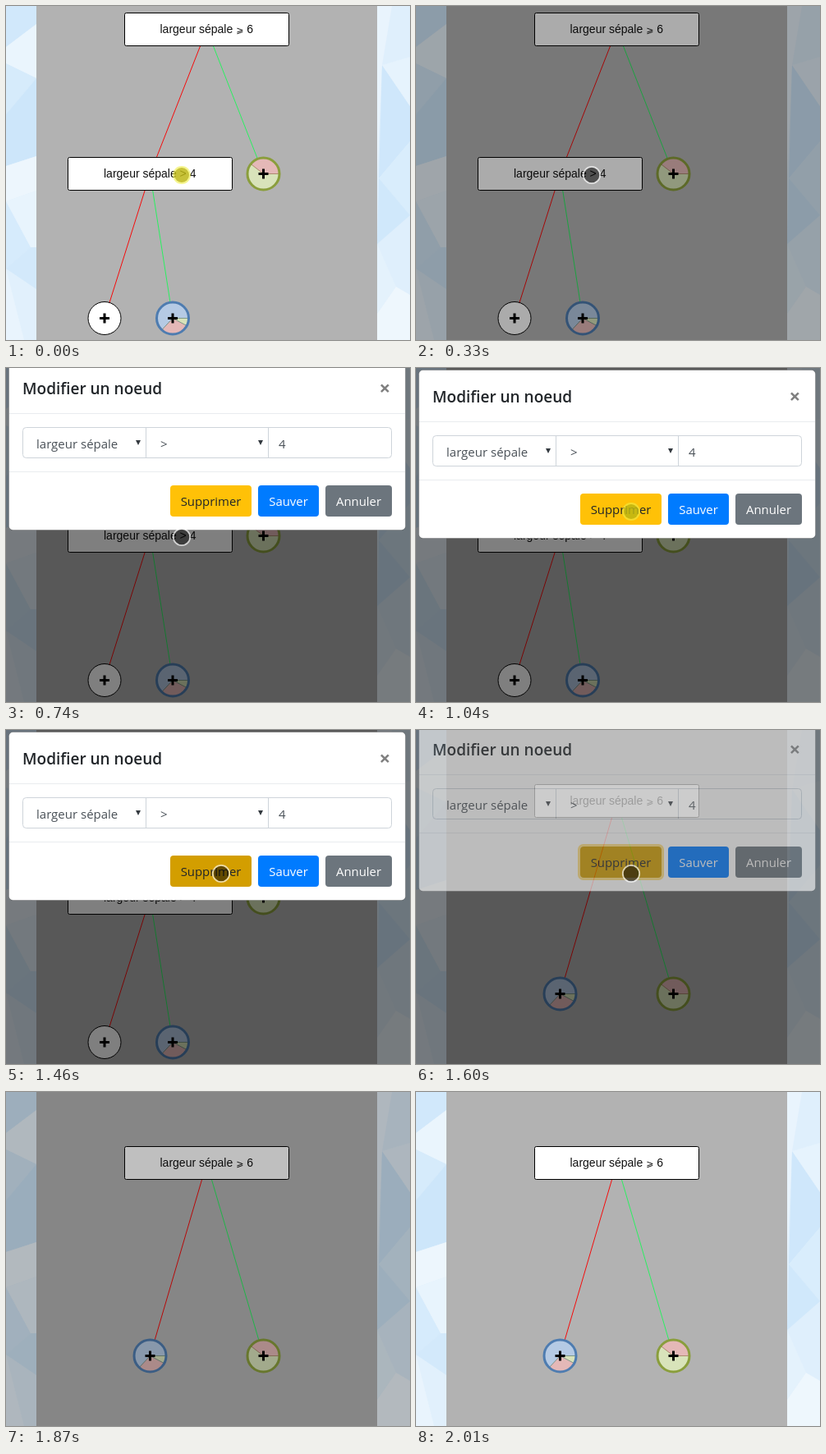
An HTML page for the animation above (2360 ms loop, 492x407 px).

```html
<!DOCTYPE html>
<html lang="fr">
<head>
<meta charset="utf-8">
<title>Modifier un noeud</title>
<style>
  html, body { margin: 0; width: 100%; height: 100%; overflow: hidden; background: #b2b2b2; }
  svg { display: block; width: 492px; height: 407px; }

  .label { font: 14px "Liberation Sans", Arial, sans-serif; fill: #111; }
  .sign { font: 11px "DejaVu Sans", sans-serif; }
  .box { fill: #fff; stroke: #000; }
  .no { fill: none; stroke: #f50a0a; }
  .yes { fill: none; stroke: #2af060; }
  .plus { fill: none; stroke: #000; stroke-width: 3; }

  .modal text { font: 15px "Open Sans", "Noto Sans", sans-serif; fill: #495057; }
  .modal .title { font-size: 19px; font-weight: 600; fill: #212529; }
  .modal .close { font-size: 24px; font-weight: 700; fill: #7f7f7f; }
  .modal .btn { font-size: 14.9px; font-weight: 500; fill: #fff; text-anchor: middle; }
  .modal .dark { fill: #212529; }
  .field { fill: none; stroke: #ced4da; }
  .rule { stroke: #e9ecef; }

  /* every pose is held until the next one */
  .before, .after, .shade, .modal, .delete, .focus, .cursor, .idle, .down {
    animation: 2360ms step-end infinite;
  }
  .before { animation-name: before; }
  .after { animation-name: after; }
  .shade { animation-name: shade; }
  .modal { animation-name: modal; }
  .delete { animation-name: delete; }
  .focus { animation-name: focus; }
  .cursor { animation-name: cursor; }
  .idle { animation-name: idle; }
  .down { animation-name: down; }

  @keyframes before { 0% { opacity: 1 } 67.796%, 100% { opacity: 0 } }
  @keyframes after { 0% { opacity: 0 } 67.796%, 100% { opacity: 1 } }
  @keyframes shade {
    0% { opacity: 0 }
    13.983% { opacity: .33 }
    19.915% { opacity: .5 }
    79.237% { opacity: .25 }
    85.169%, 100% { opacity: 0 }
  }
  @keyframes modal {
    0% { opacity: 0; transform: translateY(-50px) }
    19.915% { opacity: .22; transform: translateY(-41px) }
    25.847% { opacity: 1; transform: translateY(-20px) }
    31.355% { opacity: 1; transform: translateY(-10px) }
    37.711% { opacity: 1; transform: none }
    67.796% { opacity: .6; transform: translateY(-11px) }
    73.728% { opacity: .1; transform: translateY(-31px) }
    79.237%, 100% { opacity: 0; transform: translateY(-50px) }
  }
  @keyframes delete {
    0% { fill: #ffc107 }
    50% { fill: #e0a800 }
    55.932%, 100% { fill: #d39e00 }
  }
  @keyframes focus { 0% { opacity: 0 } 67.796%, 100% { opacity: .5 } }
  @keyframes cursor {
    0% { opacity: 1; transform: translate(214px, 206px) }
    44.067% { opacity: 1; transform: translate(262px, 175px) }
    79.237%, 100% { opacity: 0; transform: translate(262px, 175px) }
  }
  @keyframes idle { 0%, 44.067% { opacity: 1 } 8.05%, 61.864%, 100% { opacity: 0 } }
  @keyframes down { 0%, 44.067% { opacity: 0 } 8.05%, 61.864%, 100% { opacity: 1 } }
</style>
</head>
<body>
<svg viewBox="0 0 492 407">
  <defs>
    <path id="plus" class="plus" d="M-6 0H6M0-6V6"/>
    <g id="blueNode">
      <circle r="19.5" fill="#b5cae4"/>
      <path d="M0 0H19A19 19 0 0 1 16.8 8.9Z" fill="#d8e3ba"/>
      <path d="M0 0L16.8 8.9A19 19 0 0 1-13 13.9Z" fill="#e4b8b7"/>
      <path d="M19 0H0L16.8 8.9M0 0L-13 13.9" fill="none" stroke="#6c8a78" stroke-width=".8"/>
      <circle r="19.5" fill="none" stroke="#4e7cb0" stroke-width="3"/>
      <use href="#plus"/>
    </g>
    <g id="greenNode">
      <circle r="19.5" fill="#d8e3ba"/>
      <path d="M0 0L-15-11.7A19 19 0 0 1 19 0Z" fill="#e4b8b7"/>
      <path d="M-15-11.7L0 0H19" fill="none" stroke="#a3795c" stroke-width=".8"/>
      <circle r="19.5" fill="none" stroke="#8a9e3c" stroke-width="3"/>
      <use href="#plus"/>
    </g>
    <rect id="box" class="box" x="-100" y="-20" width="200" height="40" rx="2"/>
    <g id="root">
      <use href="#box"/>
      <text class="label" x="-57" y="4.5">largeur sépale <tspan class="sign">⩾</tspan> 6</text>
    </g>
  </defs>

  <g>
    <path fill="#e1f0fc" d="M0 0H37V407H0Z"/>
    <path fill="#d1e8fb" d="M0 0H37V22L0 50Z"/>
    <path fill="#eaf5fd" d="M0 50L37 22V88L0 70Z"/>
    <path fill="#d6ebfb" d="M0 70L37 88L0 132Z"/>
    <path fill="#cde6fa" d="M0 132L37 88V183L0 195Z"/>
    <path fill="#edf6fd" d="M0 195L37 183V225L0 238Z"/>
    <path fill="#d6ebfc" d="M0 238L30 294L0 320Z"/>
    <path fill="#e8f4fd" d="M37 225V294H30L0 238Z"/>
    <path fill="#d3e9fb" d="M0 320L30 294H37V345Z"/>
    <path fill="#e9f4fd" d="M0 320L22 407H0Z"/>

    <path fill="#dfeffc" d="M452 0H492V407H452Z"/>
    <path fill="#e9f4fd" d="M452 0H470L458 72L452 210Z"/>
    <path fill="#cfe7fb" d="M458 72L492 122V165L454 210Z"/>
    <path fill="#e6f3fd" d="M458 72L492 62V122Z"/>
    <path fill="#d9edfc" d="M454 210L492 165V255Z"/>
    <path fill="#d0e8fb" d="M454 210L492 255L452 290Z"/>
    <path fill="#e4f2fc" d="M452 290L475 342L452 375Z"/>
    <path fill="#eef7fd" d="M475 342L492 352V407H452V375Z"/>
  </g>
  <path fill="#b2b2b2" d="M37 0H452V407H37Z"/>

  <g class="before">
    <path class="no" d="M244.5 28.5L175.5 204.5L120 380.5"/>
    <path class="yes" d="M244.5 28.5L313.5 204.5M175.5 204.5L203 380.5"/>
    <use href="#root" x="244.5" y="28.5"/>
    <use href="#box" x="175.5" y="204.5"/>
    <text class="label" x="119" y="209">largeur sépale &gt; 4</text>
    <use href="#greenNode" x="313.5" y="204.5"/>
    <g transform="translate(120 380.5)">
      <circle r="20" fill="#fff" stroke="#000"/>
      <use href="#plus"/>
    </g>
    <use href="#blueNode" x="203" y="380.5"/>
  </g>

  <g class="after">
    <path class="no" d="M244.5 86.5L175.5 321.5"/>
    <path class="yes" d="M244.5 86.5L313.5 321.5"/>
    <use href="#root" x="244.5" y="86.5"/>
    <use href="#blueNode" x="175.5" y="321.5"/>
    <use href="#greenNode" x="313.5" y="321.5"/>
  </g>

  <rect class="shade" width="492" height="407"/>

  <g class="modal">
    <rect x="3.5" y="2.5" width="483" height="205" rx="5" fill="#fff" stroke="#000" stroke-opacity=".2"/>
    <text class="title" x="20" y="42">Modifier un noeud</text>
    <text class="close" x="454.5" y="43">×</text>
    <path class="rule" d="M4 65.5H486M4 136.5H486"/>
    <rect class="field" x="20.5" y="82.5" width="449" height="37" rx="4"/>
    <path class="field" d="M170.5 82V120M319.5 82V120"/>
    <text x="37" y="108">largeur sépale</text>
    <text x="188" y="108">&gt;</text>
    <text x="332" y="108">4</text>
    <path fill="#343a40" d="M158 98H164L161 104ZM307 98H313L310 104Z"/>
    <rect class="focus" x="198.5" y="151.5" width="102" height="41" rx="5" fill="none" stroke="#ffc107" stroke-width="3"/>
    <rect class="delete" x="200" y="153" width="99" height="38" rx="4"/>
    <rect x="307" y="153" width="74" height="38" rx="4" fill="#007bff"/>
    <rect x="389" y="153" width="81" height="38" rx="4" fill="#6c757d"/>
    <text class="btn dark" x="249.5" y="178">Supprimer</text>
    <text class="btn" x="344" y="178">Sauver</text>
    <text class="btn" x="429.5" y="178">Annuler</text>
  </g>

  <g class="cursor">
    <g class="idle">
      <circle r="11" fill="#eeee46" fill-opacity=".6"/>
      <circle r="9" fill="#a8a000" fill-opacity=".6"/>
    </g>
    <g class="down">
      <circle r="9.5" fill="#000" fill-opacity=".53"/>
      <circle r="10.2" fill="none" stroke="#fff" stroke-opacity=".65" stroke-width="1.8"/>
    </g>
  </g>
</svg>
</body>
</html>
```
